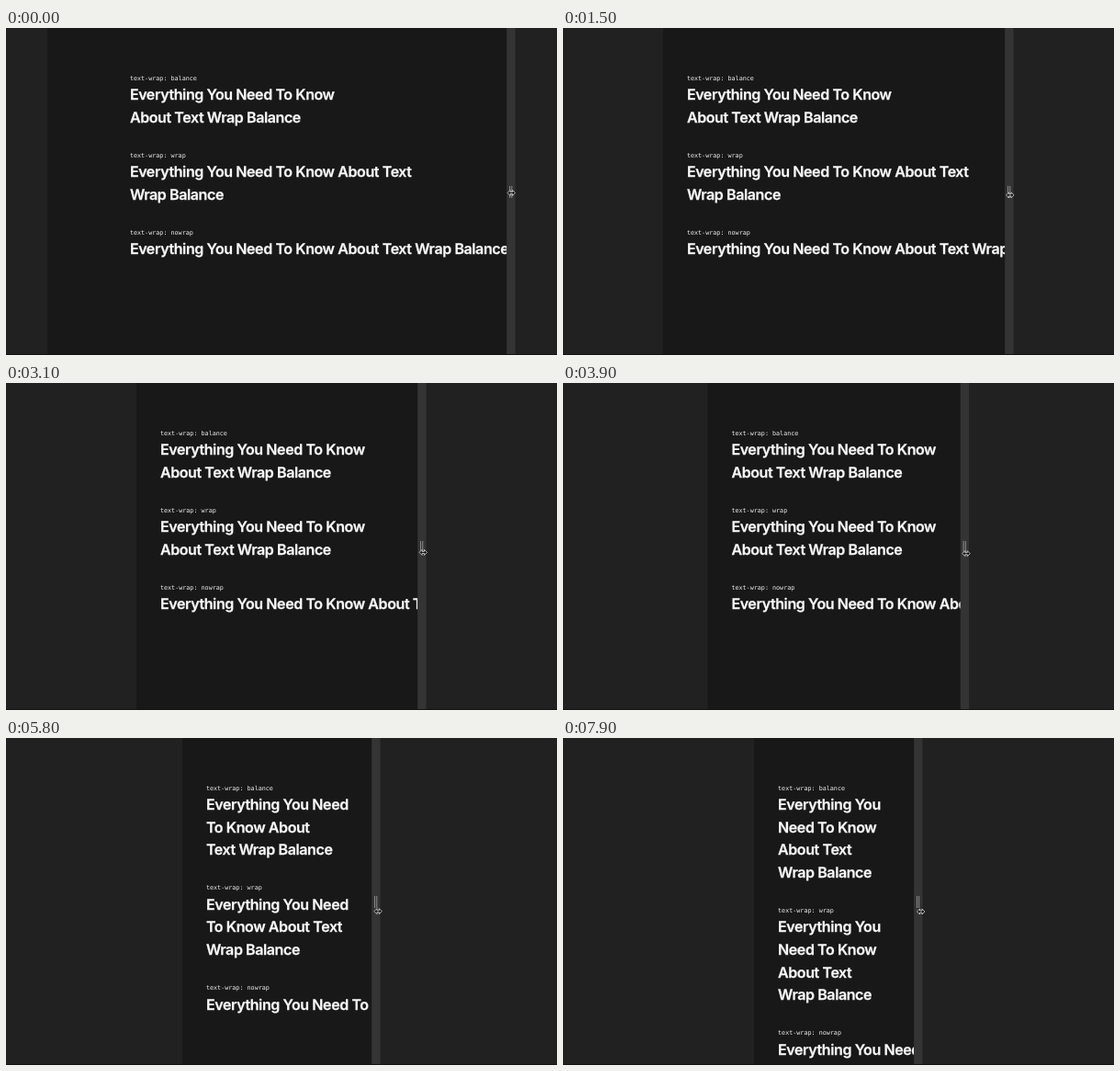
Recreate the animation shown at these times as an HTML page. Size 600 px wide and 356 px high, loop 8000 ms.

```html
<!DOCTYPE html>
<html lang="en">
<head>
<meta charset="utf-8">
<title>text-wrap</title>
<style>
  html, body { margin: 0; width: 100%; height: 100%; overflow: hidden; background: #212121; }
  svg { display: block; width: 600px; height: 356px; }
  text { text-rendering: geometricPrecision; }
  .label { font: 6.74px "DejaVu Sans Mono", monospace; fill: #efefef; }
  .title {
    font: 600 16px Inter, sans-serif; letter-spacing: -0.4px;
    fill: #fafafa; stroke: #fafafa; stroke-width: 0.25;
  }
  .outside { fill: #212121; }
  .panel { fill: #181818; }
  .handle { fill: #343434; }
  .grip { stroke: #8c8c8c; stroke-width: 1; }
  .cursor { fill: #141414; stroke: #dcdcdc; stroke-width: 0.8; }
</style>
</head>
<body>
<svg viewBox="0 0 600 356">
  <rect class="outside" width="600" height="356"/>
  <rect class="panel" id="panel" width="600" height="356"/>
  <g id="copy"></g>
  <g id="edge">
    <rect class="outside" x="-9.3" width="600" height="356"/>
    <rect class="handle" x="-9.3" width="9.3" height="356"/>
    <path class="grip" d="M-6 172V185M-3.8 172V185"/>
  </g>
  <rect y="355" width="600" height="1" fill="#151112"/>
  <path class="cursor" id="cursor" d="M-4.2 0L-1.2 -3V-1H1.2V-3L4.2 0L1.2 3V1H-1.2V3Z"/>
</svg>
<script>
  const LOOP = 8000, STEP = 100;
  const LINE = 24.65, GAP = 34.75, TRACKING = -0.4;
  const words = 'Everything You Need To Know About Text Wrap Balance'.split(' ');

  // Drag path: time and left edge of the panel
  const drag = [
    [0, 45], [1500, 109], [2400, 128.5], [3900, 157.5],
    [5000, 180.5], [6700, 205], [LOOP, 208.4]
  ];

  const $ = id => document.getElementById(id);
  const pen = document.createElement('canvas').getContext('2d');
  pen.font = '600 16px Inter, sans-serif';
  const measure = s => pen.measureText(s).width + s.length * TRACKING;

  function leftEdge(t) {
    const i = drag.findIndex(k => k[0] > t);
    const [t0, a] = drag[i - 1], [t1, b] = drag[i];
    return a + (b - a) * (t - t0) / (t1 - t0);
  }

  function wrap(width) {
    const lines = [words[0]];
    for (const word of words.slice(1)) {
      const longer = lines[lines.length - 1] + ' ' + word;
      if (measure(longer) <= width) lines[lines.length - 1] = longer;
      else lines.push(word);
    }
    return lines;
  }

  // Narrowest width with the same line count, then filled from the last line up
  function balance(width) {
    const count = wrap(width).length;
    let tight = width;
    while (wrap(tight - 0.5).length === count) tight -= 0.5;
    const lines = [words[words.length - 1]];
    for (const word of words.slice(0, -1).reverse()) {
      const longer = word + ' ' + lines[0];
      if (measure(longer) <= tight) lines[0] = longer;
      else lines.unshift(word);
    }
    return lines;
  }

  const modes = { balance, wrap, nowrap: () => wrap(Infinity) };

  function block(name, lines, x, y) {
    const row = (cls, dy, s) => `<text class="${cls}" x="${x}" y="${y + dy}">${s}</text>`;
    return row('label', 0, 'text-wrap: ' + name) +
      lines.map((s, i) => row('title', 21.4 + i * LINE, s)).join('');
  }

  function draw(t) {
    const left = leftEdge(t);
    const right = 599.6 - left;
    const width = Math.min(320, 539 - 2 * left);
    const x = Math.max(134.9, left + 25.9);
    let y = 56.7, html = '';
    for (const name in modes) {
      const lines = modes[name](width);
      html += block(name, lines, x, y);
      y += GAP + lines.length * LINE;
    }
    $('copy').innerHTML = html;
    $('panel').setAttribute('x', left);
    $('edge').setAttribute('transform', `translate(${right})`);

    // The pointer drifts down and slightly ahead of the handle
    const px = right - 4.3 + 2.6 * t / LOOP;
    const py = 179.5 + 9.5 * Math.min(1, t / 6000);
    $('cursor').setAttribute('transform', `translate(${px} ${py})`);
  }

  const begin = performance.now();
  let shown = -1;
  function tick() {
    const t = Math.floor((performance.now() - begin) % LOOP / STEP) * STEP;
    if (t !== shown) draw(shown = t);
    requestAnimationFrame(tick);
  }
  tick();
</script>
</body>
</html>
```
